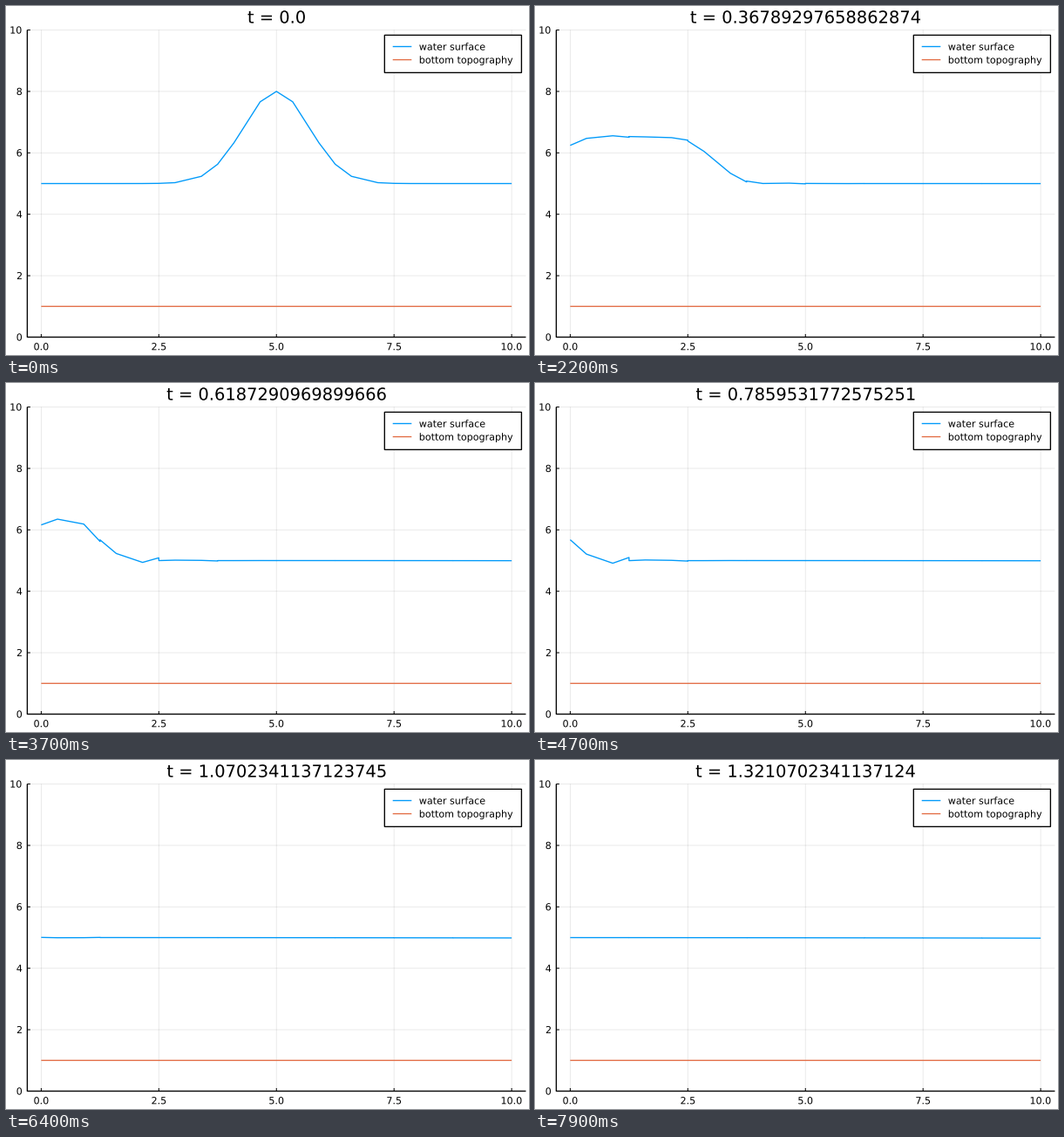
Recreate the animation shown at these times as a matplotlib script. Size 600 px wide and 400 px high, loop 8000 ms.

```python
import numpy as np
import matplotlib.pyplot as plt
from matplotlib.animation import FuncAnimation
from matplotlib.patches import PathPatch, Rectangle
from matplotlib.textpath import TextPath
from matplotlib.transforms import Affine2D

plt.rcParams["font.family"] = "DejaVu Sans"

W, H, DPI = 600, 400, 100
FRAMES, INTERVAL = 80, 100
BLUE, RED = "#009AFA", "#E36F47"

# Shallow water by nodal DG: 8 cubic elements on Lobatto nodes
G, LENGTH, CELLS, BOTTOM, DRIFT = 1.0, 10.0, 8, 1.0, -10.0
DX = LENGTH / CELLS
DT, SUBSTEPS = 5 / 299, 5

nodes = np.array([-1, -np.sqrt(0.2), np.sqrt(0.2), 1])
END_WEIGHT = 1 / 6
vander = np.vander(nodes, increasing=True)
dvander = np.zeros_like(vander)
dvander[:, 1:] = vander[:, :-1] * np.arange(1, 4)
DIFF = dvander @ np.linalg.inv(vander)
x = (np.arange(CELLS)[:, None] + (nodes + 1) / 2) * DX


def flux(u):
    h, q = u
    return np.array([q, q * q / h + G * h * h / 2])


def hll(left, right):
    ul, ur = left[1] / left[0], right[1] / right[0]
    cl, cr = np.sqrt(G * left[0]), np.sqrt(G * right[0])
    lo = np.minimum(np.minimum(ul - cl, ur - cr), 0)
    hi = np.maximum(np.maximum(ul + cl, ur + cr), 0)
    return (hi * flux(left) - lo * flux(right)
            + lo * hi * (right - left)) / (hi - lo)


def inflow(t):
    h = 4 - 0.011 * t * t
    return np.array([[h], [h * DRIFT]])


def rhs(u, t):
    f = flux(u)
    left = np.concatenate([u[:, :1, 0], u[:, :, -1]], axis=1)
    right = np.concatenate([u[:, :, 0], inflow(t)], axis=1)
    star = hll(left, right)
    du = f @ DIFF.T
    du[:, :, 0] -= (star[:, :-1] - f[:, :, 0]) / END_WEIGHT
    du[:, :, -1] += (star[:, 1:] - f[:, :, -1]) / END_WEIGHT
    return -2 / DX * du


def step(u, t, dt):
    a = rhs(u, t)
    b = rhs(u + dt / 2 * a, t + dt / 2)
    c = rhs(u + dt / 2 * b, t + dt / 2)
    d = rhs(u + dt * c, t + dt)
    return u + dt / 6 * (a + 2 * b + 2 * c + d)


def solve():
    h = 4 + 3 * np.exp(-(x - 5) ** 2)
    u = np.array([h, h * DRIFT])
    surfaces = []
    dt = DT / SUBSTEPS
    for k in range(FRAMES):
        surfaces.append(u[0].ravel() + BOTTOM)
        for s in range(SUBSTEPS):
            u = step(u, k * DT + s * dt, dt)
    return surfaces


surfaces = solve()

# Stage in pixel coordinates, y downwards
fig = plt.figure(figsize=(W / DPI, H / DPI), dpi=DPI, facecolor="white")
ax = fig.add_axes([0, 0, 1, 1])
ax.set_xlim(0, W)
ax.set_ylim(H, 0)
ax.axis("off")

LEFT, RIGHT, TOP, BASE = 24.4, 596.4, 27.5, 379.5
SMALL, LARGE = 8 * DPI / 72, 14 * DPI / 72
HALF_CAP = 0.365 * SMALL


def px(v):
    return 40.4 + 53.97 * np.asarray(v)


def py(v):
    return BASE - 35.2 * np.asarray(v)


def line(xs, ys, color="black", width=1.35, **kw):
    return ax.plot(xs, ys, color=color, lw=width * 72 / DPI, snap=False,
                   solid_capstyle="butt", **kw)[0]


def glyphs(tx, ty, text, size=SMALL, align=0.0):
    """Outline of a text; align is 0 left, 0.5 centre, 1 right."""
    path = TextPath((0, 0), text, size=size)
    box = path.get_extents()
    shift = tx - align * (box.x0 + box.x1)
    return path.transformed(Affine2D().scale(1, -1).translate(shift, ty))


def label(*args, **kw):
    patch = PathPatch(glyphs(*args, **kw), fc="black", lw=0, snap=False,
                      zorder=4)
    return ax.add_patch(patch)


for v in (0, 2.5, 5, 7.5, 10):
    p = px(v)
    line([p, p], [TOP, BASE], width=0.8, alpha=0.1)
    line([p, p], [BASE, BASE - 3.5], width=1)
    label(p, 394.3, f"{v:.1f}", align=0.5)
for v in (0, 2, 4, 6, 8, 10):
    p = py(v)
    line([LEFT, RIGHT], [p, p], width=0.8, alpha=0.1)
    line([LEFT, LEFT + 3.5], [p, p], width=1)
    label(18.8, p + HALF_CAP, str(v), align=1)
line([LEFT, LEFT, RIGHT], [TOP, BASE, BASE])

water = line(px(x.ravel()), py(surfaces[0]), BLUE)
line(px([0, LENGTH]), py([BOTTOM, BOTTOM]), RED)

ax.add_patch(Rectangle((434.3, 33.4), 157.1, 43, fc="white", ec="black",
                       lw=1.35 * 72 / DPI, snap=False, zorder=3))
for y, color, name in ((46.5, BLUE, "water surface"),
                       (61.6, RED, "bottom topography")):
    line([443.7, 465.3], [y, y], color, zorder=4)
    label(473.8, y + HALF_CAP, name)


def title_path(k):
    return glyphs(310.2, 19.6, f"t = {5 * k / 299}", size=LARGE, align=0.5)


title = ax.add_patch(PathPatch(title_path(0), fc="black", lw=0, snap=False))


def draw(k):
    water.set_ydata(py(surfaces[k]))
    title.set_path(title_path(k))
    return water, title


anim = FuncAnimation(fig, draw, frames=FRAMES, interval=INTERVAL,
                     init_func=lambda: draw(0), repeat=True, repeat_delay=0)
plt.show()
```
